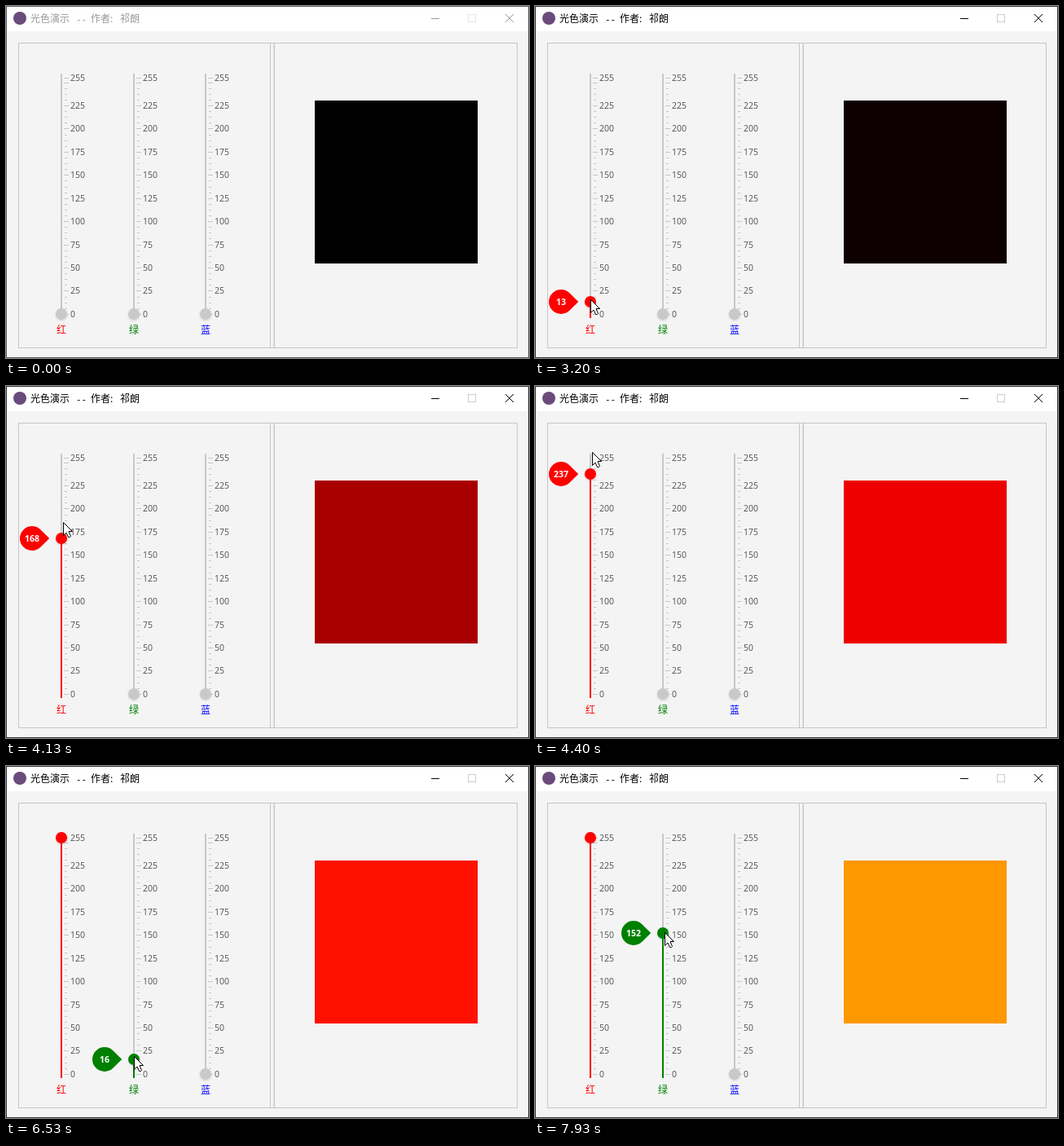
Recreate the animation shown at these times as an HTML page. Size 642x432 px, loop 8000 ms.

```html
<!DOCTYPE html>
<html lang="zh">
<head>
<meta charset="utf-8">
<style>
  html, body { margin: 0; width: 100%; height: 100%; overflow: hidden; background: #f4f4f4; }
  svg { display: block; }
  .cjk { font: 12px "Noto Sans CJK SC", "Noto Sans CJK", sans-serif; }
  .mono { font: 11px "Liberation Mono", monospace; }
  .num { font: 10.5px "Open Sans", "Noto Sans", sans-serif; fill: #505050; }
  .tip { font-weight: 700; fill: #fff; text-anchor: middle; }
  .crisp { shape-rendering: crispEdges; }
  .line { fill: none; stroke: #c6c6c9; }
</style>
</head>
<body>
<svg width="642" height="432" viewBox="0 0 642 432">
  <defs>
    <filter id="shadow" x="-50%" y="-50%" width="200%" height="200%">
      <feDropShadow dx="0" dy="1" stdDeviation="1.2" flood-opacity=".16"/>
    </filter>
  </defs>
  <rect width="642" height="432" fill="#f4f4f4"/>
  <rect width="642" height="31" fill="#fff"/>
  <rect id="frame" class="crisp" x=".5" y=".5" width="641" height="431" fill="none"/>
  <circle cx="17" cy="15" r="8" fill="#6b4a7c"/>
  <g id="title" class="cjk">
    <text x="30" y="20">光色演示</text>
    <text x="86" y="20" class="mono">--</text>
    <text x="104" y="20">作者:</text>
    <text x="140" y="20">祁朗</text>
  </g>
  <g id="buttons" fill="none">
    <path class="crisp" d="M522 15.5h10"/>
    <path d="M613 10l10 10m0-10l-10 10"/>
  </g>
  <rect id="maximize" class="crisp" x="567.5" y="10.5" width="9" height="9" fill="none"/>
  <g class="line crisp">
    <rect x="15.5" y="45.5" width="612" height="374"/>
    <path d="M324.5 45v375M329.5 45v375"/>
    <path d="M328.5 46v373" stroke="#dedee0"/>
  </g>
  <rect id="swatch" class="crisp" x="379" y="116" width="200" height="200"/>
  <g id="sliders"></g>
  <path id="cursor" d="M.5 .5V16.5L4 13 6.5 18.5H8.5L9.5 17.5 7 11.5H11.5Z" fill="#fff" stroke="#000"/>
</svg>
<script>
const STEP = 1000 / 15, STEPS = 120, ACTIVATE = 32;
const $ = id => document.getElementById(id);
const clamp = (v, lo = 0, hi = 1) => Math.min(hi, Math.max(lo, v));
const yOf = v => Math.round(377.9 - v * 290 / 255);

function set(el, attrs) {
  for (const k in attrs) el.setAttribute(k, attrs[k]);
  return el;
}

function add(parent, tag, attrs, text = "") {
  const el = set(document.createElementNS("http://www.w3.org/2000/svg", tag), attrs);
  el.textContent = text;
  return parent.appendChild(el);
}

// Pointer waypoints: step, x, y
const path = [
  [1, 0, 394], [12, 76, 372], [15, 67, 378], [24, 67, 378], [36, 67, 376],
  [48, 68, 360], [58, 70, 250], [66, 70, 81], [70, 70, 30],
  [84, 157, 382], [91, 156, 388], [98, 157, 356], [114, 159, 212], [119, 159, 204]
];

// Monotone cubic curve through one column of the waypoints
function along(n, col) {
  const slope = i => path[i] && path[i + 1]
    ? (path[i + 1][col] - path[i][col]) / (path[i + 1][0] - path[i][0]) : 0;
  const tangent = i => {
    const a = slope(i - 1), b = slope(i);
    return a * b > 0 ? 2 * a * b / (a + b) : 0;
  };
  const i = clamp(path.findIndex(p => p[0] > n) - 1, 0, path.length - 2);
  const last = path[path.length - 1];
  if (n >= last[0]) return last[col];
  const [p, q] = [path[i], path[i + 1]], h = q[0] - p[0];
  const u = clamp((n - p[0]) / h), w = 1 - u;
  return p[col] * w * w * (1 + 2 * u) + q[col] * u * u * (3 - 2 * u)
    + h * u * w * (w * tangent(i) - u * tangent(i + 1));
}

// A drag lasts from press to release; the value follows the pointer height
function slider(x, name, color, drag) {
  const g = add($("sliders"), "g");
  add(g, "rect", { class: "crisp", x: x - 1, y: 83, width: 2, height: 300, fill: "#c8c8c8" });
  for (let i = 0; i <= 41; i++) {
    const v = Math.min(i * 6.25, 255), major = i % 4 === 0 || v === 255, y = yOf(v);
    add(g, "path", { class: "line crisp", d: major ? `M${x + 3} ${y + .5}h6` : `M${x + 4} ${y + .5}h3` });
    if (major && v !== 250) add(g, "text", { class: "num", x: x + 11, y: y + 4 }, v);
  }
  add(g, "text", { class: "cjk", x: x - 6, y: 402, fill: color }, name);
  const bar = add(g, "rect", { class: "crisp", x: x - 1, width: 2, fill: color });
  const thumb = add(g, "circle", { cx: x, r: 7, filter: "url(#shadow)" });
  const tip = add(g, "g");
  add(tip, "path", { d: "M21.2 0L10.6 10.6A15 15 0 1 1 10.6-10.6Z", fill: color });
  const label = add(tip, "text", { class: "num tip", y: 4 });

  return n => {
    let v = 0, grip = 0;
    if (drag) {
      const y = Math.round(along(clamp(n, drag.press, drag.release), 2));
      v = Math.round(clamp((drag.zero - y) / drag.gain, 0, 255));
      grip = clamp((n - drag.press + 1) / 3) - clamp((n - drag.release) / 3);
    }
    const y = yOf(v);
    set(bar, { y, height: v ? 383 - y : 0 });
    set(thumb, { cy: y, fill: v ? color : "#c9c9c9" });
    set(tip, {
      visibility: grip > 0 ? "visible" : "hidden",
      transform: `translate(${x - 36 * grip} ${y}) scale(${grip})`
    });
    label.textContent = v;
    return v;
  };
}

const channels = [
  slider(68, "红", "#ff0000", { press: ACTIVATE, release: 71, zero: 376, gain: 1.245 }),
  slider(157, "绿", "#008000", { press: 90, release: STEPS, zero: 373.9, gain: 1.118 }),
  slider(245, "蓝", "#0000ff")
];

function draw(n) {
  const active = n >= ACTIVATE, ink = active ? "#000" : "#999";
  set($("title"), { fill: ink });
  set($("buttons"), { stroke: ink });
  set($("maximize"), { stroke: active ? "#ccc" : "#e6e6e6" });
  set($("frame"), { stroke: active ? "#38383c" : "#5c5c62" });
  set($("swatch"), { fill: `rgb(${channels.map(value => value(n))})` });
  set($("cursor"), {
    visibility: n > 0 ? "visible" : "hidden",
    transform: `translate(${Math.round(along(n, 1))} ${Math.round(along(n, 2))})`
  });
}

const start = performance.now();
function tick(now) {
  const t = Math.max(0, now - start) % (STEP * STEPS);
  draw(Math.min(STEPS - 1, Math.floor((t + 4) / STEP)));
  requestAnimationFrame(tick);
}
draw(0);
requestAnimationFrame(tick);
</script>
</body>
</html>
```
